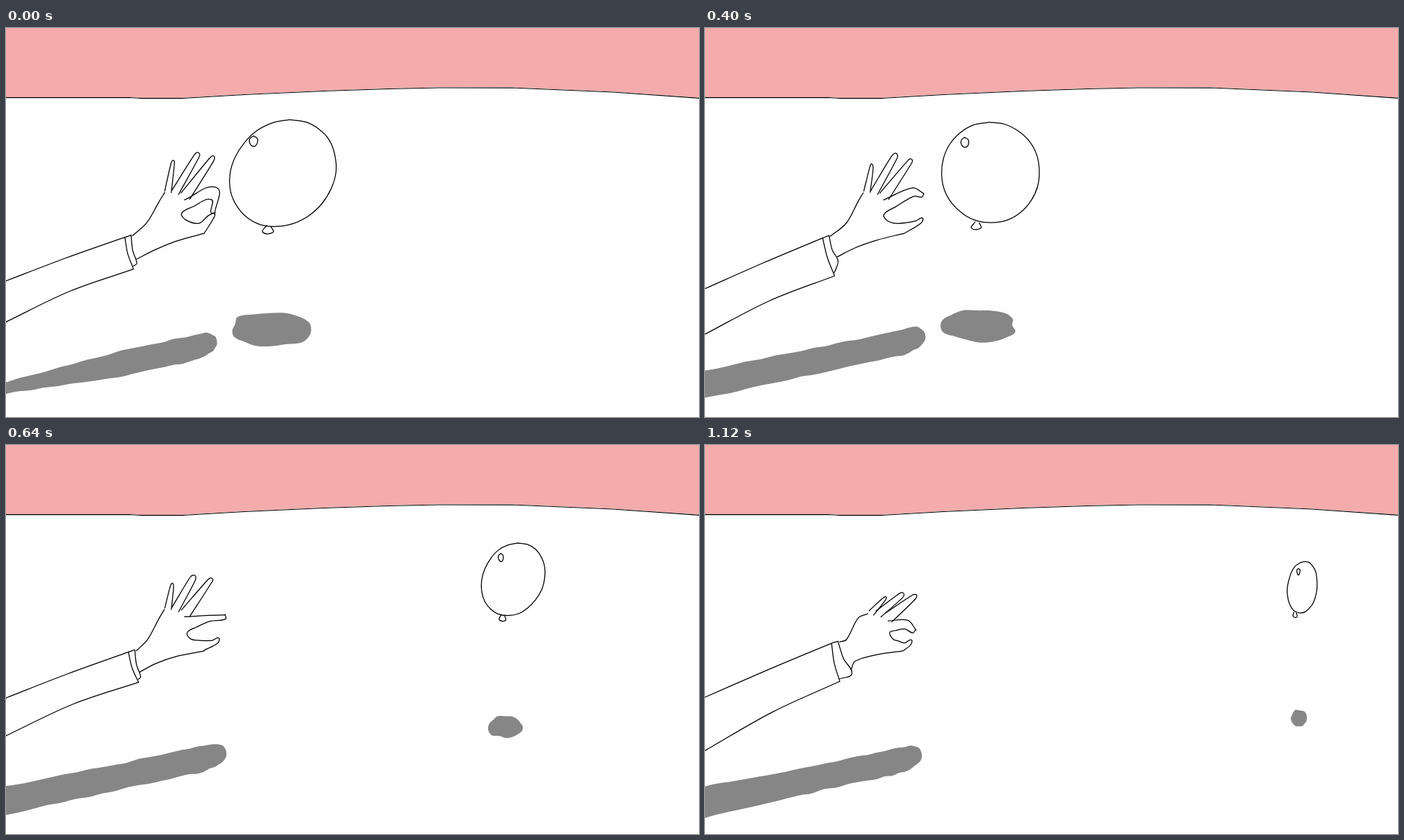
These frames come from a looping animation (960 px wide and 540 px high, 1.2 s). An HTML page with a canvas:

```html
<!DOCTYPE html>
<html lang="en">
<head>
<meta charset="utf-8">
<title>Balloon flick</title>
<style>
  html, body { margin: 0; width: 100%; height: 100%; overflow: hidden; background: #fefefe; }
  canvas { display: block; width: 960px; height: 540px; }
</style>
</head>
<body>
<canvas id="stage" width="960" height="540"></canvas>
<script>
const ctx = document.getElementById('stage').getContext('2d');
const STEP_MS = 80, STEPS = 15;
const PAPER = '#fefefe', SKY = '#f3abab', SHADE = '#868686';

// Key poses by step; everything between them is interpolated.
const BALLOON = { // x, y, rx, ry, lean
  0: [383, 201, 73, 74, -11], 3: [383, 201, 71, 72, 2], 5: [395, 200, 68, 70, 0],
  6: [482, 193, 55.5, 61, -1], 8: [702, 186, 43.5, 50.5, -8], 9: [756, 184, 36, 46, -6],
  10: [795, 182, 30.5, 43, -4], 12: [815.5, 188.5, 29.5, 39, -4], 14: [827, 197, 20.5, 36, -3]
};
const SLEEVE = { // height of the upper and lower line at the left edge
  0: [350, 407], 3: [361, 412], 6: [361, 430], 8: [350, 403], 10: [354, 412], 12: [350, 431], 14: [349, 424]
};
const SLEEVE_TOP = { 0: [164, 290], 6: [162, 291], 8: [169, 287], 14: [175, 275] };
const SLEEVE_END = { 0: [176, 334], 3: [181, 336], 6: [178, 347], 8: [183, 329], 14: [186, 328] };
const CUFF_END = { 0: [181, 326], 8: [186, 321], 14: [203, 317] };
const KNUCKLE_SHIFT = { 0: [0, 0], 10: [0, 0], 12: [6, 6] };
const FINGERS = [
  { base: [224, 227], width: [9, 5], tip: { 0: [231, 184], 10: [230, 194], 12: [246, 198], 14: [250, 211] } },
  { base: [234, 228], width: [11, 8], tip: { 0: [266, 173], 6: [264, 175], 10: [257, 187], 12: [277, 197], 14: [274, 206] } },
  { base: [248, 233], width: [15, 7], tip: { 0: [287, 178], 10: [284, 187], 12: [296, 212], 14: [292, 208] } }
];
const INDEX_JOINT = { 0: [291, 221], 6: [286, 221], 8: [282, 236], 10: [285, 235], 14: [280, 243] };
const INDEX_TIP = {
  0: [289, 256], 3: [293, 258], 6: [307, 214], 8: [303, 235], 10: [295, 246], 12: [289, 252], 14: [292, 256]
};
const THUMB_TIP = { 0: [288, 257], 3: [295, 260], 6: [303, 265], 8: [294, 267], 14: [285, 270] };
const WEB = { 0: [243, 256], 10: [252, 261], 14: [255, 260] };
const ARM_SHADE = { // tip x, half height at the left edge, drop
  0: [292, 8, 5], 3: [299, 17, 0], 6: [308, 20, 0], 8: [305, 20, -1], 12: [299, 18, 0], 14: [300, 22, 1]
};

const mix = (a, b, f) => a.map((v, i) => v + (b[i] - v) * f);
const add = (p, x, y) => [p[0] + x, p[1] + y];
const along = (p, dir, d) => [p[0] + dir[0] * d, p[1] + dir[1] * d];
const normal = ([x, y]) => [-y, x];
const heading = (a, b) => {
  const d = Math.hypot(b[0] - a[0], b[1] - a[1]) || 1;
  return [(b[0] - a[0]) / d, (b[1] - a[1]) / d];
};

function pose(keys, step) {
  const at = Object.keys(keys).map(Number);
  const from = at.findLast(k => k <= step), to = at.find(k => k > step);
  return to === undefined ? keys[from] : mix(keys[from], keys[to], (step - from) / (to - from));
}

// Seeded random number from -1 to 1
let seed = 1;
function wobble() {
  seed = (seed * 1664525 + 1013904223) % 4294967296;
  return seed / 2147483648 - 1;
}

// Smooth curve through the points, with short handles so corners stay tight
function trace(pts) {
  const last = pts.length - 1;
  const dirs = pts.map((p, i) => heading(pts[Math.max(0, i - 1)], pts[Math.min(last, i + 1)]));
  ctx.beginPath();
  ctx.moveTo(...pts[0]);
  for (let i = 0; i < last; i++) {
    const [p, q] = [pts[i], pts[i + 1]], h = Math.hypot(q[0] - p[0], q[1] - p[1]) * .33;
    ctx.bezierCurveTo(...along(p, dirs[i], h), ...along(q, dirs[i + 1], -h), ...q);
  }
}

function ink(...pts) {
  trace(pts.map(p => add(p, wobble() * .4, wobble() * .4)));
  ctx.stroke();
}

function smudge(pts) {
  trace(pts);
  ctx.closePath();
  ctx.fill();
}

function oval(x, y, rx, ry, lean = 0, n = 20, rough = 0) {
  const pts = Array.from({ length: n }, (_, i) => {
    const a = i / n * 2 * Math.PI - 1.6, r = 1 + wobble() * rough;
    return [x + (rx * Math.cos(a) + lean * Math.sin(a)) * r, y + ry * Math.sin(a) * r];
  });
  return [...pts, pts[0]];
}

function drawBackdrop() {
  const horizon = [[-2, 96], [170, 96], [185, 97], [245, 97], [330, 92], [440, 87],
    [530, 84], [600, 82.5], [700, 82.5], [840, 88.5], [962, 97]];
  ctx.fillStyle = PAPER;
  ctx.fillRect(-1, -1, 962, 542);
  ctx.beginPath();
  horizon.forEach(p => ctx.lineTo(...p));
  ctx.stroke();
  ctx.lineTo(962, -2);
  ctx.lineTo(-2, -2);
  ctx.fillStyle = SKY;
  ctx.globalCompositeOperation = 'darken';
  ctx.fill();
  ctx.globalCompositeOperation = 'source-over';
}

function drawShades(step) {
  const [tip, left, drop] = pose(ARM_SHADE, step);
  const edge = (side, taper) => Array.from({ length: 25 }, (_, i) => {
    const x = -4 + (tip + 4) * Math.sin(i / 24 * Math.PI / 2);
    const end = Math.max(0, (x - tip + taper) / taper);
    const half = left + (18 - left) * Math.min(1, x / 160);
    return [x, 494 + drop - .212 * x + side * (half * Math.sqrt(Math.max(0, 1 - end * end)) + wobble())];
  });
  ctx.fillStyle = SHADE;
  smudge([...edge(-1, 18), ...edge(1, 42).reverse()]);

  const [x, , rx] = pose(BALLOON, step), area = rx * rx;
  smudge(oval(x - rx * .24, 375 + area * .0082, 7 + area * .0093, 10.5 + area * .0025, 0, 16, .1));
}

function drawBalloon(step) {
  const [x, y, rx, ry, lean] = pose(BALLOON, step);
  ink(...oval(x, y, rx, ry, lean));
  ink(...oval(x - rx * (.15 + rx * .0055), y - ry * .6, .7 + rx * .07, 2 + ry * .07, 0, 6));
  const knot = [x - 6 - rx * .2, y + ry - 1], w = 1 + rx * .08, h = 3 + ry * .08;
  ink(add(knot, -2, 0), add(knot, -w, h), add(knot, w, h), add(knot, w * .6, 1));
}

function drawSleeve(step) {
  const [upper, lower] = pose(SLEEVE, step);
  const top = pose(SLEEVE_TOP, step), end = pose(SLEEVE_END, step), cuff = pose(CUFF_END, step);
  const wrist = add(top, 9, -3);
  ink([-2, upper + 1], add(mix([0, upper], top, .5), 0, -1), top, wrist);
  ink([-2, lower + 1], add(mix([0, lower], end, .5), 0, -6), end);
  ink(top, add(mix(top, end, .5), -2, 1), end);
  ink(wrist, add(mix(wrist, cuff, .5), -2, 2), cuff, add(end, 0, -4));
}

function drawFinger(base, tip, [wide, slim]) {
  const dir = heading(base, tip), side = normal(dir), neck = along(tip, dir, -5);
  ink(along(base, side, -wide / 2), along(neck, side, -slim / 2), along(tip, side, -slim / 4),
    along(tip, side, slim / 4), along(neck, side, slim / 2), along(base, side, wide / 2));
}

function drawHand(step) {
  const shift = pose(KNUCKLE_SHIFT, step), base = p => add(p, ...shift);
  for (const f of FINGERS) drawFinger(base(f.base), pose(f.tip, step), f.width);
  const wrist = add(pose(SLEEVE_TOP, step), 11, -2);
  ink(wrist, [195, 270], [212, 240], base([219, 228]));

  // The more the index finger bends, the thicker its middle joint
  const root = base([247, 238]), joint = pose(INDEX_JOINT, step), tip = pose(INDEX_TIP, step);
  const [a, b] = [heading(root, joint), heading(joint, tip)];
  const bend = Math.acos(a[0] * b[0] + a[1] * b[1]);
  const inner = along(joint, normal(heading(root, tip)), 8 + bend * 5);
  const web = pose(WEB, step), thumb = pose(THUMB_TIP, step);
  ink(root, joint, tip);
  ink(tip, along(tip, normal(b), 6), inner, add(mix(inner, web, .6), 0, -1), web,
    add(web, 5, 9), [267, 271], add(thumb, -9, 4), thumb, add(thumb, -1, 7), [274, 285]);
  ink([274, 285], [238, 295 - step * .3], [207, 307 - step * .5], add(pose(CUFF_END, step), -1, -6));
}

function draw(step) {
  seed = step * 7919 + 17;
  drawBackdrop();
  drawShades(step);
  drawSleeve(step);
  drawHand(step);
  drawBalloon(step);
}

ctx.translate(.5, .5);
ctx.lineCap = ctx.lineJoin = 'round';
ctx.lineWidth = 1.25;
const start = performance.now();
let shown = -1;

function tick() {
  const step = Math.floor((performance.now() - start) / STEP_MS) % STEPS;
  if (step !== shown) draw(shown = step);
  requestAnimationFrame(tick);
}
tick();
</script>
</body>
</html>
```
